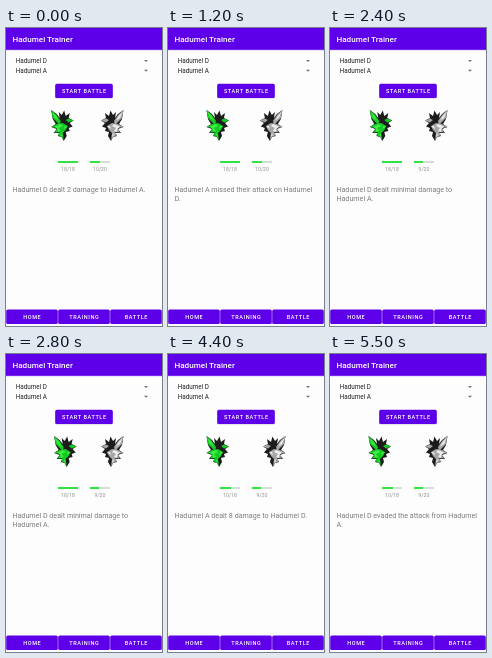
Recreate the animation shown at these times as an HTML page. Size 156 px wide and 298 px high, loop 5600 ms.

```html
<!DOCTYPE html>
<html lang="en">
<head>
<meta charset="utf-8">
<title>Hadumel Trainer</title>
<style>
  html, body { margin: 0; width: 100%; height: 100%; overflow: hidden; background: #fefdfe; }
  svg { display: block; width: 100vw; height: 100vh; font-family: Roboto, sans-serif; }
  .purple { fill: #5d00e9; }
  .title { font-size: 8.1px; font-weight: 500; fill: #fff; letter-spacing: .03px; }
  .caps { font-size: 5.56px; font-weight: 500; fill: #fff; letter-spacing: .58px; text-anchor: middle; }
  .item { font-size: 6.35px; fill: #222; }
  .log { font-size: 7.15px; fill: #7c7c7c; }
  .hp { font-size: 5.2px; fill: #929292; text-anchor: middle; }
  .track { fill: #d3dfd3; }
  .bar { fill: #30e244; }
  #d { --main: #16c822; --light: #38f043; }
  #a { --main: #a6a6a6; --light: #ececec; }
</style>
</head>
<body>
<svg viewBox="0 0 156 298" preserveAspectRatio="none">
  <defs>
    <g id="fighter">
      <path fill="#1c1c1c" d="M38.500 82L44 86 47 90 46 84 49 87 51.500 82.500 53 88 57 85 56 90 61 92.500 57 95 60 98.500 56 100 57 103 53 104 54 108 51 113 49 109 45 108 47 105 41 105 44 101 38.500 99 43 96 40 91Z"/>
      <path style="fill:var(--main)" d="M38.500 82L43.500 86.500 48 93 47 97 43 93 40 90ZM38.500 99L44 96 50 95 55 98 53 102 50 105 51 112 49 109 45 107 47 104 42 104.500 45 100ZM56 90.500L61 92.500 56 94.500 53 92Z"/>
      <path style="fill:var(--light)" d="M39.500 84L43 87.500 46 92.500 42 90ZM42 98.500L48 96 50 98 46 100 48 103 45 104 44.500 101ZM52 98L55 98.500 51 101ZM49 105L50 109 48 107Z"/>
    </g>
  </defs>

  <rect width="156" height="298" fill="#fefdfe"/>
  <rect width="156" height="22.600" fill="#5d00e930"/>
  <rect class="purple" width="156" height="21.800"/>
  <text class="title" x="6.400" y="14">Hadumel Trainer</text>

  <text class="item" x="9.700" y="35.300">Hadumel D</text>
  <text class="item" x="9.700" y="44.800">Hadumel A</text>
  <path fill="#707070" d="M138 32h4l-2 2zM138 41.700h4l-2 2z"/>

  <rect x="49" y="56.500" width="58" height="14.300" rx="1.600" fill="#0002"/>
  <rect class="purple" x="49.200" y="55.800" width="57.600" height="14.200" rx="1.600"/>
  <text class="caps" x="78.300" y="65">START BATTLE</text>

  <rect class="track" x="52" y="133" width="20" height="2"/>
  <rect class="track" x="84" y="133" width="20" height="2"/>
  <rect class="bar" id="barD" x="52" y="133" height="2"/>
  <rect class="bar" id="barA" x="84" y="133" height="2"/>
  <text class="hp" id="hpD" x="62" y="143"></text>
  <text class="hp" id="hpA" x="94" y="143"></text>

  <use id="d" href="#fighter"/>
  <use id="a" href="#fighter"/>

  <text class="log" id="line1" x="6.400" y="164"></text>
  <text class="log" id="line2" x="6.400" y="172.500"></text>

  <g class="purple">
    <rect x="0.200" y="281.500" width="51.600" height="14.500" rx="1.600"/>
    <rect x="52.200" y="281.500" width="51.600" height="14.500" rx="1.600"/>
    <rect x="104.200" y="281.500" width="51.600" height="14.500" rx="1.600"/>
  </g>
  <text class="caps" x="26.300" y="290.700">HOME</text>
  <text class="caps" x="78.300" y="290.700">TRAINING</text>
  <text class="caps" x="130.300" y="290.700">BATTLE</text>
</svg>
<script>
const LOOP = 5600, LUNGE = 500, REACH = 48;
const D = "Hadumel D", A = "Hadumel A";
// grow: how much a strong hit enlarges the attacker at full reach
const turns = [
  { at: -60, by: "D", grow: 0, hp: [18, 10], log: [`${D} dealt 2 damage to ${A}.`] },
  { at: 1160, by: "A", grow: 0, hp: [18, 10], log: [`${A} missed their attack on Hadumel`, "D."] },
  { at: 2375, by: "D", grow: 0, hp: [18, 9], log: [`${D} dealt minimal damage to`, `${A}.`] },
  { at: 3400, by: "A", grow: .52, hp: [10, 9], log: [`${A} dealt 8 damage to ${D}.`] },
  { at: 4450, by: "D", grow: 0, hp: [10, 9], log: [`${D} evaded the attack from Hadumel`, "A."] }
];
const el = id => document.getElementById(id);
let shown;

function setHealth(name, hp, max) {
  el("bar" + name).setAttribute("width", 20 * hp / max);
  el("hp" + name).textContent = `${hp}/${max}`;
}

function showTurn(turn) {
  shown = turn;
  setHealth("D", turn.hp[0], 18);
  setHealth("A", turn.hp[1], 20);
  el("line1").textContent = turn.log[0];
  el("line2").textContent = turn.log[1] || "";
}

// side is 1 for the fighter facing right, -1 for the mirrored one
function pose(id, side, reach, grow) {
  const x = 78 + side * (REACH * reach - 28.5);
  const scale = 1 + grow * reach;
  el(id).setAttribute("transform",
    `translate(${x} 97.5) scale(${side * scale} ${scale}) translate(-49.5 -97.5)`);
}

function draw(now) {
  const t = now % LOOP;
  const turn = turns.filter(x => x.at <= t).pop();
  if (turn !== shown) showTurn(turn);
  // Ease out to the opponent and back again
  const p = Math.min(1, (t - turn.at) / LUNGE);
  const reach = (1 - Math.cos(2 * Math.PI * p)) / 2;
  pose("d", 1, turn.by === "D" ? reach : 0, turn.grow);
  pose("a", -1, turn.by === "A" ? reach : 0, turn.grow);
}

function tick() {
  draw(performance.now());
  requestAnimationFrame(tick);
}
tick();
</script>
</body>
</html>
```
